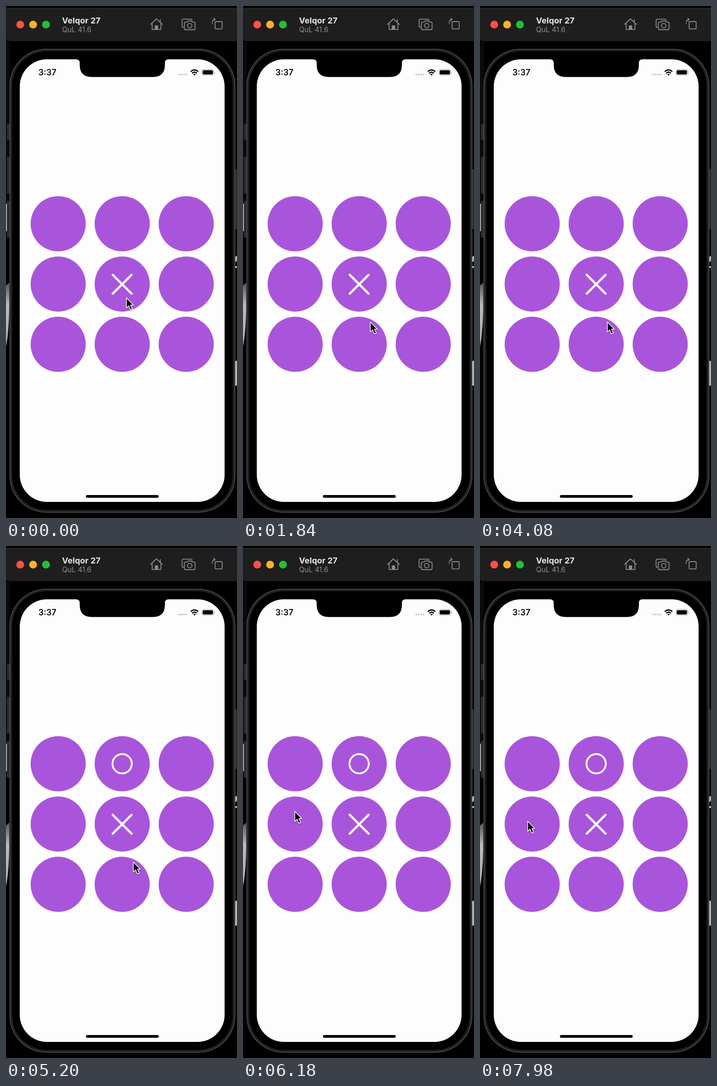
Animation, 503 px wide and 1114 px high, one loop 8 s. Source, as an HTML page:

```html
<!DOCTYPE html>
<html lang="en">
<head>
<meta charset="utf-8">
<title>Grid game</title>
<style>
  html, body { margin: 0; width: 100%; height: 100%; overflow: hidden; background: #000; }
  svg { display: block; width: 100vw; height: 100vh; }
  text { font-family: Inter, Roboto, sans-serif; }
</style>
</head>
<body>
<svg viewBox="0 0 503 1114">
  <defs>
    <linearGradient id="wedge" x1="0" y1="0" x2="0" y2="1">
      <stop offset="0" stop-color="#555"/>
      <stop offset=".35" stop-color="#bbb"/>
      <stop offset="1" stop-color="#aaa"/>
    </linearGradient>
    <filter id="shadow" x="-50%" y="-50%" width="200%" height="200%">
      <feDropShadow dx="0" dy="1.5" stdDeviation="1.2" flood-opacity=".35"/>
    </filter>
  </defs>
  <rect width="503" height="1114" fill="#000"/>

  <!-- desktop showing at the edges -->
  <rect y="78" width="9" height="420" fill="#0a0a0a"/>
  <rect y="430" width="2.5" height="60" fill="#b0b0b0"/>
  <path d="M0 608L7 602V652C7 690 4 722 0 741Z" fill="url(#wedge)"/>
  <path d="M499 546l4-3v11l-4 4zM499 566h4v4h-4zM499 772h4v54h-4z" fill="#b4b4b4"/>

  <!-- title bar -->
  <path d="M0 4.5H503V76.5H6Q0 76.5 0 71Z" fill="#1e1e1e"/>
  <path d="M0 5H503" stroke="#35352c"/>
  <g id="lights"></g>
  <text x="122" y="37.5" font-size="18" font-weight="700" fill="#e6e6e6">Velqor 27</text>
  <text x="122" y="57.2" font-size="15.5" fill="#8f8f8f">QuL 41.6</text>
  <g fill="none" stroke="#8e8e8e" stroke-width="1.8" stroke-linecap="round" stroke-linejoin="round">
    <path d="M315 40L327.5 28L340.5 40M318.3 38V51.2H337.3V38M336 34.5V29.5"/>
    <path d="M324.3 51V42.5H331V51Z" fill="#8e8e8e" stroke-width="0.5"/>
    <path d="M386 46.5Q383.4 46.5 383.4 43.5V31.5Q383.4 28.6 386.4 28.6H402Q405 28.6 405.3 31"/>
    <path d="M391 34.8H394.3L396.2 32.6H403.8L405.7 34.8H409Q411.7 34.8 411.7 37.5V48.8Q411.7 51.5 409 51.5H391Q388.3 51.5 388.3 48.8V37.5Q388.3 34.8 391 34.8Z"/>
    <circle cx="400" cy="42.7" r="4.9"/>
    <rect x="455.3" y="34" width="15.4" height="15.8" rx="2"/>
    <path d="M449.3 38.5V34.5Q449.3 29.2 454.5 29.2M452.3 26L455.5 29.2L452.3 32.4" stroke-width="1.5"/>
  </g>

  <!-- phone -->
  <g fill="#2c2c2d">
    <rect x="2" y="256" width="8" height="35" rx="1.5"/>
    <rect x="2" y="328" width="8" height="80" rx="1.5"/>
    <rect x="2" y="424" width="8" height="80" rx="1.5"/>
    <rect x="497" y="355" width="6" height="130" rx="1.5"/>
  </g>
  <rect x="8.5" y="94" width="490" height="1007.5" rx="79" fill="#202022" stroke="#58585a" stroke-width="1.4"/>
  <rect x="13.5" y="98.5" width="480" height="998" rx="75" fill="#000"/>
  <rect x="30" y="116" width="446" height="963" rx="59" fill="#fdfdfd"/>
  <path d="M152 115H354V116Q346 116 346 124V128Q346 154.5 319.5 154.5H187Q160.500 154.500 160.500 128V124Q160.500 116 152 116Z" fill="#000"/>

  <!-- status bar -->
  <text x="70.500" y="151" font-size="18" font-weight="600" fill="#0a0a0a">3:37</text>
  <g id="dots" fill="#c5c5c8"></g>
  <g fill="none" stroke="#000" stroke-width="2.7">
    <path d="M402.300 142.800Q410.500 135.300 418.700 142.800"/>
    <path d="M405.300 146.200Q410.500 141.500 415.700 146.200"/>
  </g>
  <path d="M407.700 148.500Q410.500 146.300 413.300 148.500L410.500 151.500Z"/>
  <rect x="426.500" y="138" width="26" height="12.800" rx="4" fill="none" stroke="#a0a0a0" stroke-width="1.100"/>
  <rect x="428.300" y="139.800" width="22.400" height="9.200" rx="2.400"/>
  <path d="M454 142.500Q456 144.400 454 146.500Z" fill="#a0a0a0"/>

  <!-- board -->
  <g id="board" fill="#a955db"></g>
  <path d="M232.500 585L273.300 625.800M273.300 585L232.500 625.800" stroke="#fdfdfd" stroke-width="4.800" stroke-linecap="round"/>
  <circle id="ring" cx="252.900" cy="473.800" r="21" fill="none" stroke="#fdfdfd" stroke-width="4"/>
  <rect x="174" y="1064" width="158.500" height="6" rx="3"/>

  <path id="cursor" d="M0 0V21.800L5 17.200L8.800 26L12.800 24.300L9 15.700H15.200Z" fill="#000" stroke="#fff" stroke-width="1.500" stroke-linejoin="round" filter="url(#shadow)"/>
</svg>
<script>
const LOOP = 8000, RING_AT = 4600;
const $ = id => document.getElementById(id);

function dot(parent, cx, cy, r, fill) {
  const c = document.createElementNS('http://www.w3.org/2000/svg', 'circle');
  const attrs = { cx, cy, r };
  if (fill) attrs.fill = fill;
  for (const k in attrs) c.setAttribute(k, attrs[k]);
  $(parent).append(c);
}

['#fe5049', '#fdb225', '#20c038'].forEach((fill, i) => dot('lights', 31 + 28 * i, 40.5, 8.5, fill));
for (let i = 0; i < 4; i++) dot('dots', 377.3 + 5.2 * i, 149, 1.9);
for (let i = 0; i < 9; i++) dot('board', 113.6 + 139.4 * (i % 3), 473.7 + 131.2 * Math.floor(i / 3), 60);

// Pointer moves: start, end, destination
const home = [262.3, 635];
const moves = [
  [20, 780, 277.300, 687.500],
  [5300, 6080, 112.800, 577.300],
  [6280, 7000, 103.800, 598.700]
];
const ease = p => p * p * (3 - 2 * p);

function pointer(t) {
  let [x, y] = home;
  for (const [from, to, tx, ty] of moves) {
    const p = ease(Math.min(1, Math.max(0, (t - from) / (to - from))));
    x += (tx - x) * p;
    y += (ty - y) * p;
  }
  return [x, y];
}

function draw(t) {
  $('cursor').setAttribute('transform', `translate(${pointer(t)})`);
  $('ring').setAttribute('visibility', t >= RING_AT ? 'visible' : 'hidden');
}

let start;
function tick(now) {
  start ??= now;
  draw(Math.max(0, now - start) % LOOP);
  requestAnimationFrame(tick);
}
draw(0);
requestAnimationFrame(tick);
</script>
</body>
</html>
```
